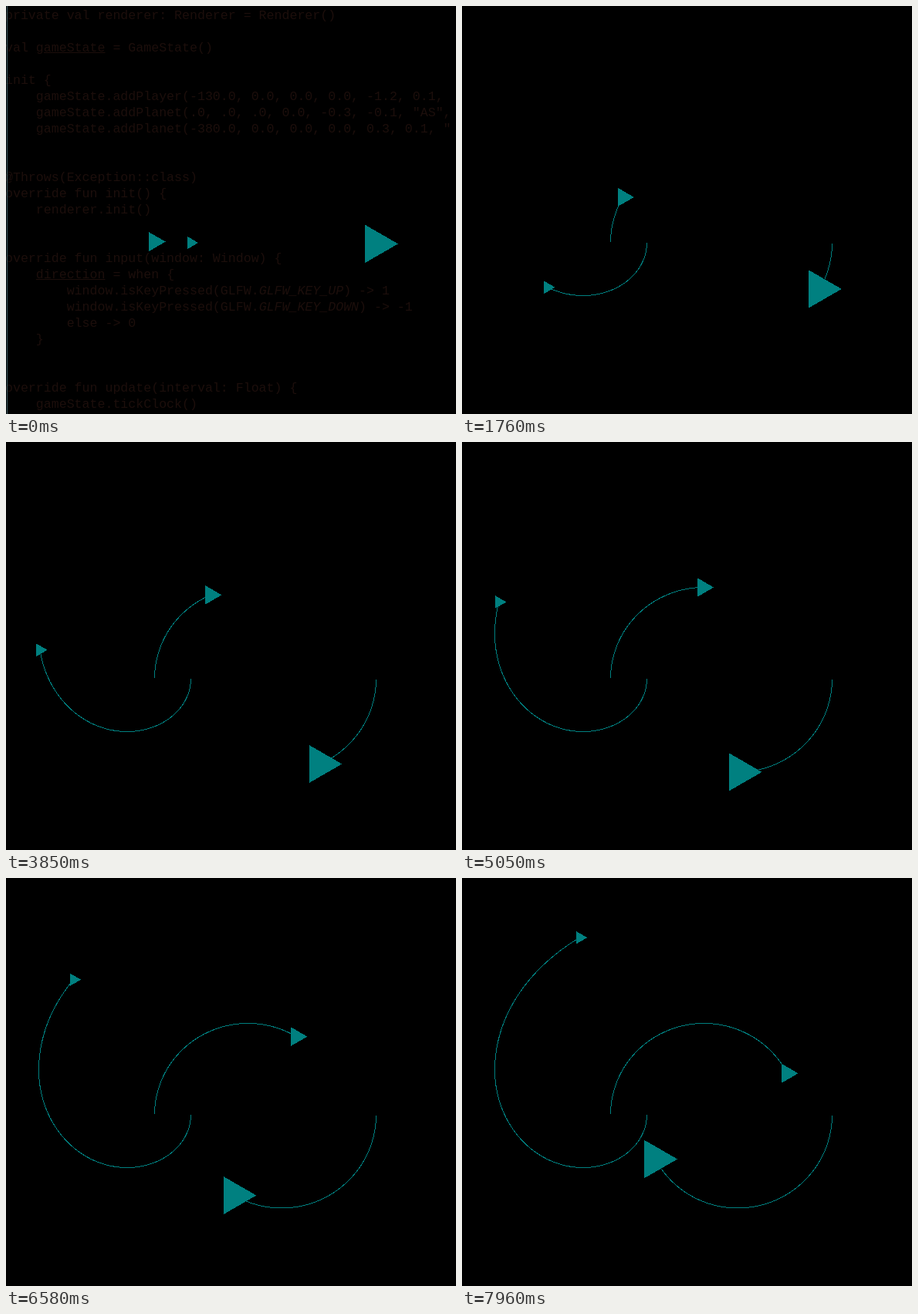
Recreate the animation shown at these times as an HTML page. Size 583 by 529 pixels, loop 8000 ms.

```html
<!DOCTYPE html>
<html>
<head>
<meta charset="utf-8">
<style>
  html, body { margin: 0; width: 100%; height: 100%; overflow: hidden; background: #000; }
  svg, pre { position: absolute; left: 0; top: 0; }
  pre {
    margin: 0; left: -1px; top: 2px; color: #1c0e0b;
    font: 16.6px/21px "Liberation Mono", monospace;
  }
  pre::before { content: ""; position: absolute; left: 2px; top: -2px; width: 1px; height: 529px; background: #3c5a60; }
  polyline { fill: none; stroke: #008080; stroke-width: 1; }
  polygon { fill: #008080; }
</style>
</head>
<body>
<pre id="code">
private val renderer: Renderer = Renderer()

val <u>gameState</u> = GameState()

init {
    gameState.addPlayer(-130.0, 0.0, 0.0, 0.0, -1.2, 0.1,
    gameState.addPlanet(.0, .0, .0, 0.0, -0.3, -0.1, "AS",
    gameState.addPlanet(-380.0, 0.0, 0.0, 0.0, 0.3, 0.1, "


@Throws(Exception::class)
override fun init() {
    renderer.init()


override fun input(window: Window) {
    <u>direction</u> = when {
        window.isKeyPressed(GLFW.<i>GLFW_KEY_UP</i>) -&gt; 1
        window.isKeyPressed(GLFW.<i>GLFW_KEY_DOWN</i>) -&gt; -1
        else -&gt; 0
    }


override fun update(interval: Float) {
    gameState.tickClock()
</pre>
<svg id="stage" width="583" height="529" shape-rendering="crispEdges"></svg>
<script>
const LOOP = 8000;
const RADIANS = Math.PI / 180;
const code = document.getElementById('code');
const stage = document.getElementById('stage');

// Kepler orbit that starts at its far end
function medium(t) {
  const eccentricity = 0.2;
  const mean = (0.8 + 19.78 * t) * RADIANS;
  let angle = mean;
  for (let i = 0; i < 8; i++) angle = mean - eccentricity * Math.sin(angle);
  return [313.5 - 121 * Math.cos(angle), 307 - 118.5 * Math.sin(angle)];
}

// The equal partner mirrors it about a slowly sinking centre
function big(t) {
  const [x, y] = medium(t);
  return [672 - x, 614 + 0.48 * t - y];
}

// The light body follows a widening spiral of quarter ellipses
const quarters = [
  { cx: 157, cy: 307, rx: 82.5, ry: 68.5, start: 0, duration: 1.03, slowing: 0.35 },
  { cx: 157, cy: 249, rx: 114.5, ry: 126.5, start: 1.03, duration: 3.24, slowing: 0.22 },
  { cx: 332.5, cy: 249, rx: 290, ry: 219, start: 4.27, duration: 6.43, slowing: 0 }
];

function small(t) {
  const index = quarters.findLastIndex(q => t >= q.start);
  const { cx, cy, rx, ry, start, duration, slowing } = quarters[index];
  const u = (t - start) / duration;
  const angle = (index + u * (1 + slowing * (1 - u))) * Math.PI / 2;
  return [cx + rx * Math.cos(angle), cy + ry * Math.sin(angle)];
}

function addShape(name) {
  return stage.appendChild(document.createElementNS('http://www.w3.org/2000/svg', name));
}

const bodies = [[medium, 14.2], [big, 28.4], [small, 9.6]].map(([at, radius]) =>
  ({ at, radius, trail: addShape('polyline'), ship: addShape('polygon') }));

function trailPoints(at, t) {
  const points = [];
  for (let s = 0; s < t; s += 0.02) points.push(at(s));
  if (t > 0) points.push(at(t));
  return points.join(' ');
}

function trianglePoints([x, y], radius) {
  const half = radius * Math.sqrt(3) / 2;
  const back = x - radius / 2;
  return [[x + radius, y], [back, y + half], [back, y - half]].join(' ');
}

function draw(ms) {
  const opening = ms < 50;
  let t = opening ? 0 : Math.min(ms, 7960) / 1000;
  if (t > 1.58 && t < 1.76) t = 1.58; // brief stall
  code.style.display = opening ? 'block' : 'none';
  for (const { at, radius, trail, ship } of bodies) {
    trail.setAttribute('points', trailPoints(at, t));
    ship.setAttribute('points', trianglePoints(at(t), radius));
  }
}

const start = performance.now();
function tick() {
  draw((performance.now() - start) % LOOP);
  requestAnimationFrame(tick);
}
tick();
</script>
</body>
</html>
```
